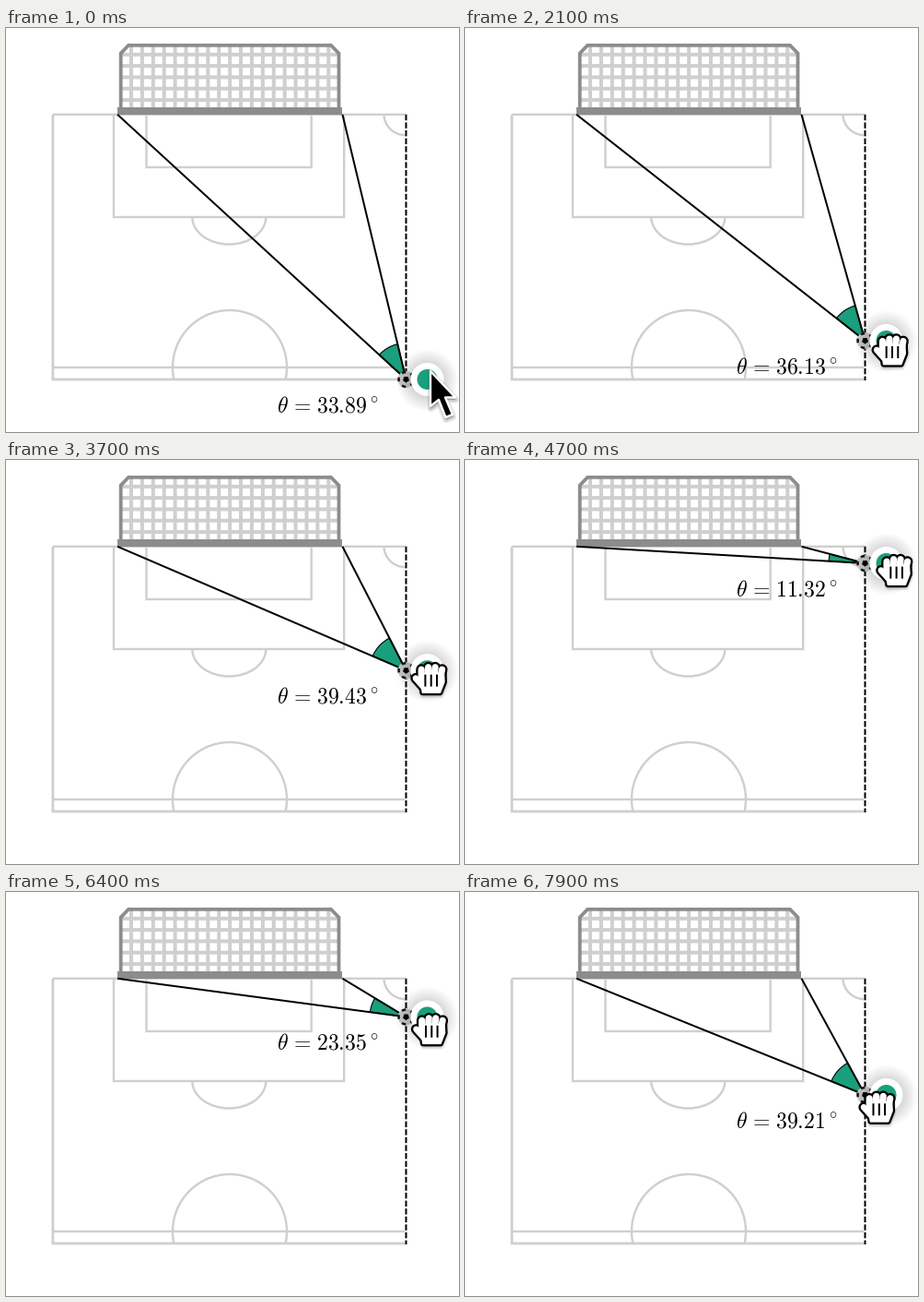
A matplotlib script for the animation above (8000 ms loop, 492 px wide and 438 px high).

```python
import numpy as np
import matplotlib.pyplot as plt
from matplotlib.animation import FuncAnimation
from matplotlib.patches import Arc, Circle, Polygon, RegularPolygon, Wedge
from matplotlib.transforms import Affine2D

W, H, DPI = 492, 438, 64
PX = 72 / DPI  # points per pixel
STEP, FRAMES = 100, 80

PALE, GREY, GREEN = "#cfcfcf", "#8c8c8c", "#1a9f7c"
TOP, BOTTOM, SIDE = 93.8, 381, 434.5
MID, HALF = 243, 121.95
POSTS = MID - HALF, MID + HALF
HANDLE = 457.5

plt.rcParams.update({"mathtext.fontset": "cm", "path.snap": False})
fig = plt.figure(figsize=(W / DPI, H / DPI), dpi=DPI, facecolor="white")
ax = fig.add_axes([0, 0, 1, 1])
ax.set(xlim=(0, W), ylim=(H, 0))
ax.axis("off")


def line(xs, ys, color=PALE, width=2.4, z=1, cap="butt", **kw):
    return ax.plot(xs, ys, color=color, lw=width * PX, zorder=z, solid_capstyle=cap,
                   solid_joinstyle="miter", **kw)[0]


def arc(x, y, rx, ry, start, end):
    ax.add_patch(Arc((x, y), 2 * rx, 2 * ry, theta1=start, theta2=end,
                     color=PALE, lw=2.4 * PX, zorder=1))


def box(left, right, bottom, width=2.4):
    line([left, left, right, right], [TOP, bottom, bottom, TOP], width=width)


def ride(patch, shift, z):
    patch.set_transform(shift + ax.transData)
    patch.set_zorder(z)
    return ax.add_patch(patch)


def glide(*keys):
    """Monotone cubic path through (time, value) keys."""
    x, y = np.array(keys, float).T
    h, s = np.diff(x), np.diff(y) / np.diff(x)
    m = np.zeros_like(x)
    same = s[:-1] * s[1:] > 0
    m[1:-1][same] = 2 * s[:-1][same] * s[1:][same] / (s[:-1] + s[1:])[same]
    m[-1] = s[-1]

    def at(t):
        i = int(np.clip(np.searchsorted(x, t, side="right") - 1, 0, len(h) - 1))
        u = np.clip((t - x[i]) / h[i], 0, 1)
        return ((1 + 2 * u) * (1 - u)**2 * y[i] + u * (1 - u)**2 * h[i] * m[i]
                + u * u * (3 - 2 * u) * y[i + 1] + u * u * (u - 1) * h[i] * m[i + 1])
    return at


# Pitch
line([50.9, SIDE], [TOP, TOP])
box(50.9, SIDE, BOTTOM, 2.8)
line([51, SIDE], [368, 368])
box(117, 367.2, 205)
box(152.5, 331.7, 151)
arc(242.3, 205, 40, 29.5, 0, 180)
arc(MID, 368, 62, 62, 168, 372)
arc(SIDE, TOP, 24, 22.5, 90, 180)

# Goal
for x in np.linspace(136, 350.3, 19):
    line([x, x], [19, 88], width=4, z=2)
for y in np.linspace(28.8, 78, 5):
    line([125, 361], [y, y], width=4, z=2)
line([124.7, 124.7, 133, 353, 361.5, 361.5], [90, 27.5, 18.8, 18.8, 27.5, 90], GREY, 3.8, 3)
line([121, 365], [90, 90], GREY, 8, 3)

# Sight lines and angle
line([SIDE, SIDE], [TOP, BOTTOM + 1], "white", 3, 3.9)
line([SIDE, SIDE], [TOP, BOTTOM + 1], "black", 2, 4,
     linestyle=(0, (3.2, 1.1)), dash_capstyle="butt")
wedge = ax.add_patch(Wedge((SIDE, BOTTOM), 39.5, 0, 1, fc=GREEN, ec="black",
                           lw=1.1 * PX, zorder=5))
sight = line([], [], "black", 2, 6)
label = ax.text(294, 0, "", fontsize=23.7 * PX, va="baseline", zorder=7)

# Ball and its handle
drag, point = Affine2D(), Affine2D()
ride(Circle((SIDE, 0), 9, fc="#cacaca", ec="none"), drag, 8)
ride(RegularPolygon((SIDE, 0), 5, radius=3.6, fc="black", ec="none"), drag, 8.1)
for a in range(36, 396, 72):
    ride(Wedge((SIDE, 0), 9.2, a - 16, a + 16, width=2.5, fc="#151515", ec="none"),
         drag, 8.1)
for r in np.linspace(19, 33, 8):
    ride(Circle((HANDLE, 1), r, fc="black", ec="none", alpha=0.019), drag, 9)
ride(Circle((HANDLE, 0), 18, fc="white", ec="none"), drag, 9.1)
ride(Circle((HANDLE, 0), 11, fc=GREEN, ec="none"), drag, 9.2)


# Pointers
def shadow(shape):
    return [ride(Polygon(np.add(shape, [0.5, 2.5]), fc="black", ec="black", alpha=0.06,
                         lw=grow * PX, joinstyle="round"), point, 10)
            for grow in (8, 6, 4, 2)]


def hand(center, step, rise, bow, thick, thumb, top, low):
    """Four fingers on a palm: black union first, white union over it."""
    limbs = [((1.5 + 6.5 * u, 3), (center + step * u, -rise + bow * u * u), thick)
             for u in np.arange(4) - 1.5]
    limbs.append(((-5, low - 6), thumb, 9))
    palm = [(-10, top), (16, top), (16.5, 4), (12, low - 1), (-7, low - 1)]
    parts = shadow(palm)
    for z, color, grow in ((11, "black", 2.3), (12, "white", -2.3)):
        parts.append(ride(Polygon(palm, fc=color, ec=color, lw=(4 + grow) * PX,
                                  joinstyle="round"), point, z))
        for (x0, y0), (x1, y1), w in limbs:
            parts.append(line([x0, x1], [y0, y1], color, w + grow, z, "round",
                              transform=point + ax.transData))
    for x in (-4, 2.3, 8.6):
        parts.append(line([x, x], [low - 20.5, low - 7.5], "black", 2, 13,
                          transform=point + ax.transData))
    return parts


ARROW = [(0, 0), (0, 38), (9, 31), (16.5, 50), (24, 47), (16, 28.5), (27, 28.5)]
arrow = shadow(ARROW) + [ride(Polygon(ARROW, fc="black", ec="white", lw=2.4 * PX,
                                      joinstyle="round"), point, 11)]
palm = hand(2.6, 10.6, 22, 3.6, 7, (-18, -1), -3, 21)
fist = hand(3, 7.5, 12.2, 1.2, 9.5, (-14.5, 0), -5, 16.5)

ball_y = glide((0.9, BOTTOM), (1.7, 370), (2.1, 339), (3.7, 228.2), (4.4, 160),
               (4.7, 111.965), (5.5, 110.5), (6.4, 135.455), (7.9, 220))
hand_x = glide((1.0, 463), (3.7, 459.4), (4.7, 466.3), (6.4, 460), (7.9, 447.5))
hand_dy = glide((1.0, -2), (2.1, 10), (4.7, 7.6), (6.4, 13.3))


def update(i):
    t = i * STEP / 1000
    y = ball_y(t)
    left, right = (np.degrees(np.arctan2(TOP - y, p - SIDE)) for p in POSTS)
    wedge.set_center((SIDE, y))
    wedge.set_theta1(left)
    wedge.set_theta2(right)
    sight.set_data([POSTS[0], SIDE, POSTS[1] + 0.5], [TOP, y, TOP])
    label.set_text(rf"$\theta\hspace{{0.14}}=\hspace{{0.12}}{right - left:.2f}^\circ$")
    label.set_y(y + 35.3)
    drag.clear().translate(0, y)
    active = arrow if t < 0.4 else palm if t < 1.15 else fist
    if active is arrow:
        point.clear().translate(461, y - 9)
    else:
        point.clear().translate(hand_x(t), y + hand_dy(t))
    for group in (arrow, palm, fist):
        for part in group:
            part.set_visible(group is active)
    return []


anim = FuncAnimation(fig, update, frames=FRAMES, interval=STEP, repeat=True,
                     repeat_delay=0, init_func=lambda: update(0), blit=False)
plt.show()
```
